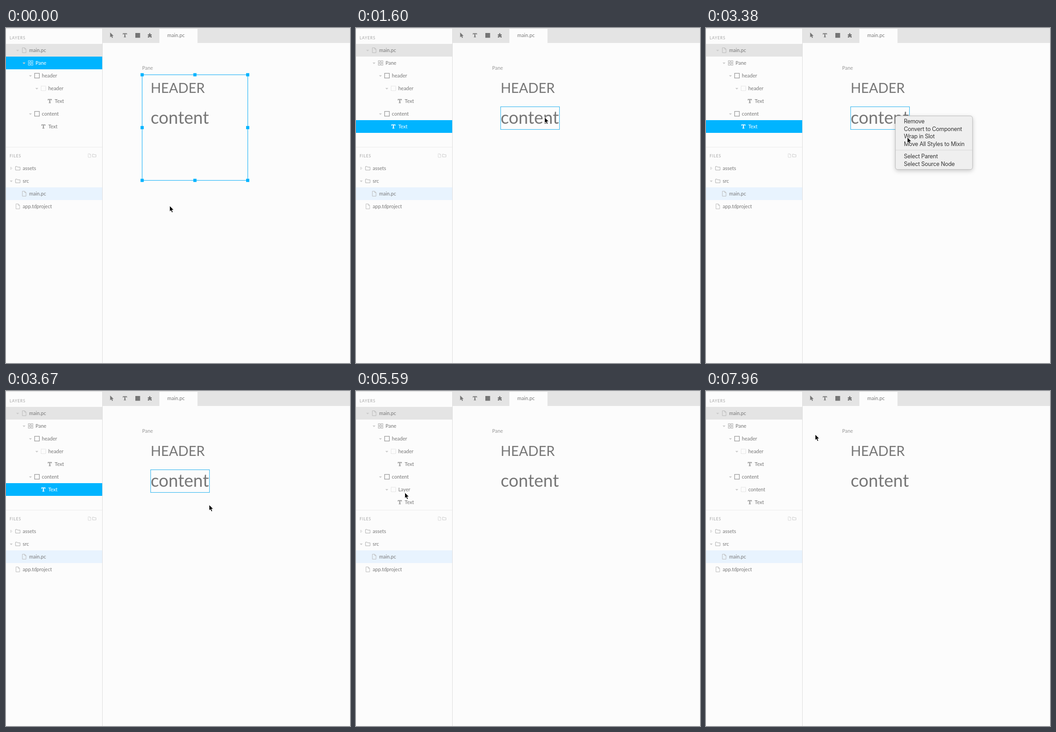
Recreate the animation shown at these times as an HTML page. Size 758 by 738 pixels, loop 8 s.

```html
<!DOCTYPE html>
<html lang="en">
<head>
<meta charset="utf-8">
<title>Wrap in Slot</title>
<style>
  html, body { margin: 0; width: 100%; height: 100%; overflow: hidden; background: #fcfcfc; }
  svg { display: block; width: 758px; height: 738px; }
  text { font-family: Lato, sans-serif; font-size: 11px; fill: currentColor; white-space: pre; }
  .caps { font-size: 8.5px; letter-spacing: .9px; color: #a4a4a4; }
  .menu { filter: drop-shadow(0 3px 5px rgba(0, 0, 0, .2)); }
  .menu text { font-family: Inter, sans-serif; font-size: 12.4px; letter-spacing: -.25px; }
</style>
</head>
<body>
<svg id="stage" viewBox="0 0 758 738"></svg>
<script>
const LOOP = 8000;
const BLUE = '#00b4ff', PALE = '#e8f3fe', GREY = '#e4e4e4', INK = '#777';
const stage = document.getElementById('stage');

// Timelines: [start time, value...]; the latest started entry holds.
const cursorSteps = [
  [0, 360, 391], [80, 400, 138], [260, 405, 150], [370, 412, 234], [490, 415, 196],
  [1930, 415, 198], [2310, 418, 203], [2430, 430, 222], [2550, 443, 240], [3670, 447, 250],
  [3790, 446, 290], [3910, 430, 345], [4030, 400, 252], [4150, 350, 150], [4260, 310, 90],
  [4380, 290, 66], [4500, 270, 72], [4600, 215, 100], [4700, 150, 150], [4910, 104, 195],
  [5120, 105, 205], [5220, 106, 215], [5320, 107, 223], [7850, 180, 150], [7960, 240, 95]
];
const hoverSteps = [[0, ''], [260, 'header'], [370, 'content'], [1600, ''], [3790, 'pane'], [4030, '']];
const menuSteps = [[0, null], [1930, -1], [2310, 0], [2430, 1], [2550, 2], [3300, -1], [3390, 2], [3480, null]];
const typedSteps = [[0, ''], [6690, 'co'], [6780, 'con'], [6990, 'conte'], [7080, 'conten'], [7290, 'content']];
const at = (steps, t) => steps.findLast(step => step[0] <= t).slice(1);

const rect = (x, y, w, h, fill, extra = '') =>
  `<rect x="${x}" y="${y}" width="${w}" height="${h}" fill="${fill}" ${extra}/>`;
const frame = (x, y, w, h, stroke = 'currentColor', width = 1, extra = '') =>
  rect(x, y, w, h, 'none', `stroke="${stroke}" stroke-width="${width}" ${extra}`);
const text = (x, y, label, extra = '') => `<text x="${x}" y="${y}" ${extra}>${label}</text>`;
const line = (d, stroke, extra = '') => `<path d="${d}" fill="none" stroke="${stroke}" ${extra}/>`;
const place = (x, y, body, scale = 1) => `<g transform="translate(${x} ${y}) scale(${scale})">${body}</g>`;

// Icons are drawn around their own centre.
const fileShape = 'M-4 -5.5H1L4 -2.5V5.5H-4ZM1 -5.5V-2.5H4';
const folderShape = 'M-5 4V-4H-1.5L-.5 -2.5H5V4Z';
const letterT = 'M-4.5 -4.5H4.5V-1.5H3.4L2.8 -3H1.1V3.2L2.4 3.6V4.5H-2.4V3.6L-1.1 3.2V-3H-2.8L-3.4 -1.5H-4.5Z';
const icons = {
  file: on => line(fileShape, on ? '#fff' : '#bbb'),
  folder: () => line(folderShape, '#aaa'),
  component: on => [[-5, -5], [1, -5], [-5, 1], [1, 1]]
    .map(([x, y]) => frame(x, y, 4, 4, on ? '#bfeaff' : '#aaa')).join(''),
  box: () => frame(-5.2, -5.2, 10.4, 10.4, '#999', 1.3),
  slot: () => frame(-5, -5, 10, 10, '#d8d8d8', 1, 'stroke-dasharray="2 1"'),
  text: on => `<path d="${letterT}" fill="${on ? '#fff' : '#999'}"/>`
};
const openArrow = '<path d="M-3.2 -1H3.2L0 2.4Z" fill="#ccc"/>';
const closedArrow = line('M-1.2 -3L1.8 0L-1.2 3Z', '#ccc');

function row({ y, depth, icon, label, arrow, fill, on }) {
  const x = 11.5 + depth * 14.1;
  return (fill ? rect(0, y - 14, 212, 28, fill) : '') +
    (arrow ? place(x, y, arrow === 'open' ? openArrow : closedArrow) : '') +
    place(x + 14.5, y, icons[icon](on)) +
    `<g color="${on ? '#fff' : INK}">${text(x + 25.3, y + 4, label)}</g>`;
}

function layers(t, hover) {
  const paneOn = t < 1600, textOn = t >= 1600 && t < 3790;
  const wrapped = t >= 3790, expanded = t >= 5590, editing = t >= 5950 && t < 7550;
  const shift = editing ? 1 : 0;
  const rows = [
    { depth: 1, icon: 'file', label: 'main.pc', arrow: 'open', fill: GREY },
    { depth: 2, icon: 'component', label: 'Pane', arrow: 'open', on: paneOn,
      fill: paneOn ? BLUE : hover === 'pane' && PALE },
    { depth: 3, icon: 'box', label: 'header', arrow: 'open' },
    { depth: 4, icon: 'slot', label: 'header', arrow: 'open' },
    { depth: 5, icon: 'text', label: 'Text', fill: hover === 'header' && PALE },
    { depth: 3, icon: 'box', label: 'content', arrow: 'open' }
  ];
  if (wrapped) {
    rows.push({ depth: 4, icon: 'slot', arrow: expanded ? 'open' : 'closed', shift,
      label: editing ? '' : t < 5950 ? 'Layer' : 'content' });
    if (expanded) rows.push({ depth: 5, icon: 'text', label: 'Text', shift });
  } else {
    rows.push({ depth: 4, icon: 'text', label: 'Text', on: textOn,
      fill: textOn ? BLUE : hover === 'content' && PALE });
  }
  return rows.map((r, i) => row({ ...r, y: 49 + 28 * i - (r.shift || 0) })).join('') +
    (editing ? nameField(t) : '');
}

function nameField(t) {
  const [typed] = at(typedSteps, t);
  const caret = t < 6390 || t >= 6690 ? '<tspan font-weight="100" dx="-1">|</tspan>' : '';
  return rect(89.5, 208.5, 107, 17, '#fff', 'stroke="#ccc"') +
    `<g color="#333">${text(92, 220.5, typed + caret)}</g>`;
}

function files() {
  return [
    { depth: 0, icon: 'folder', label: 'assets', arrow: 'closed' },
    { depth: 0, icon: 'folder', label: 'src', arrow: 'open' },
    { depth: 1, icon: 'file', label: 'main.pc', fill: PALE },
    { depth: 0, icon: 'file', label: 'app.tdproject' }
  ].map((r, i) => row({ ...r, y: 309 + 28 * i })).join('');
}

function chrome() {
  const pointer = '<path d="M-3.5 -6V4.5L-1 2.3L.8 6L2.6 5.1L.9 1.6H4.2Z"/>';
  const puzzle = '<path d="M-4.5 -2H-1.6C-2.8 -5.8 2.2 -5.8 1 -2H4V.4C1.8 -.6 1.8 3 4 2V5H1.2C2 2.6 -2 2.6 -1.2 5H-4.5V2.2C-2 3 -2 -.2 -4.5 .6Z"/>';
  return rect(0, 0, 758, 1.6, '#e2e2e2') +
    rect(213, 1, 545, 32, GREY) + rect(338, 2, 84, 32, '#fcfcfc') +
    rect(212, 1, 1, 737, '#dedede') + rect(0, 262, 212, 1, '#ececec') +
    `<g fill="#757575">${place(233, 16, pointer)}${place(262, 16, `<path d="${letterT}"/>`)}${place(317, 16, puzzle)}</g>` +
    rect(285, 11, 10.5, 10.5, '#757575') +
    `<g color="${INK}">${text(355.5, 20, 'main.pc', 'letter-spacing=".15"')}</g>` +
    text(8, 24.5, 'LAYERS', 'class="caps"') + text(8, 285, 'FILES', 'class="caps"') +
    place(184, 281, line(fileShape, '#ccc'), .72) + place(194.5, 281, line(folderShape, '#bbb'), .76);
}

function canvasArea(t, hover) {
  let out = `<g color="#999">${text(300, 91.5, 'Pane')}</g><g color="${INK}">` +
    text(318.7, 143, 'HEADER', 'style="font-size:30px"') +
    text(318.7, 211, 'content', 'style="font-size:38px"') + '</g>';
  if (t < 1600 || hover === 'pane') out += frame(300, 103, 232.7, 232.7, '#25b5f8', 1.2);
  if (t < 1600) {
    for (const x of [300, 416.3, 532.6]) for (const y of [103, 219.4, 335.7])
      if (x !== 416.3 || y !== 219.4) out += rect(x - 3.5, y - 3.5, 7, 7, BLUE);
  }
  if (hover === 'header') out += frame(318.5, 112.5, 118, 41, '#30b5ef');
  if (hover === 'content' || (t >= 1600 && t < 5590)) out += frame(318.7, 173.5, 129.7, 50, '#30b5ef', 1.1);
  return out;
}

function menu(active) {
  if (active === null) return '';
  const items = ['Remove', 'Convert to Component', 'Wrap in Slot', 'Move All Styles to Mixin',
    'Select Parent', 'Select Source Node'];
  const body = items.map((label, i) => {
    const y = 205.5 + 16.7 * i + (i > 3 ? 10.3 : 0), on = i === active;
    return (on ? rect(417.5, y - 8.3, 170, 16.7, '#4d90f8') : '') +
      `<g color="${on ? '#fff' : '#353535'}">${text(436, y + 4.5, label)}</g>`;
  }).join('');
  return '<g class="menu">' + rect(417.3, 193.7, 170, 118, '#efefef', 'rx="5" stroke="#b8b8b8"') +
    body + rect(418, 268.5, 169, 1, '#d6d6d6') + '</g>';
}

const cursor = (x, y) => place(x, y,
  '<path d="M.6 .6V13.6L3.4 10.9L5.5 15.6L7.9 14.5L5.8 10H9.8Z" fill="#000" stroke="#fff" stroke-width="1"/>');

let shown = '';
function render() {
  const t = performance.now() % LOOP;
  const [hover] = at(hoverSteps, t), [active] = at(menuSteps, t);
  const scene = chrome() + layers(t, hover) + files() + canvasArea(t, hover) +
    menu(active) + cursor(...at(cursorSteps, t));
  if (scene !== shown) stage.innerHTML = shown = scene;
  requestAnimationFrame(render);
}
render();
</script>
</body>
</html>
```
